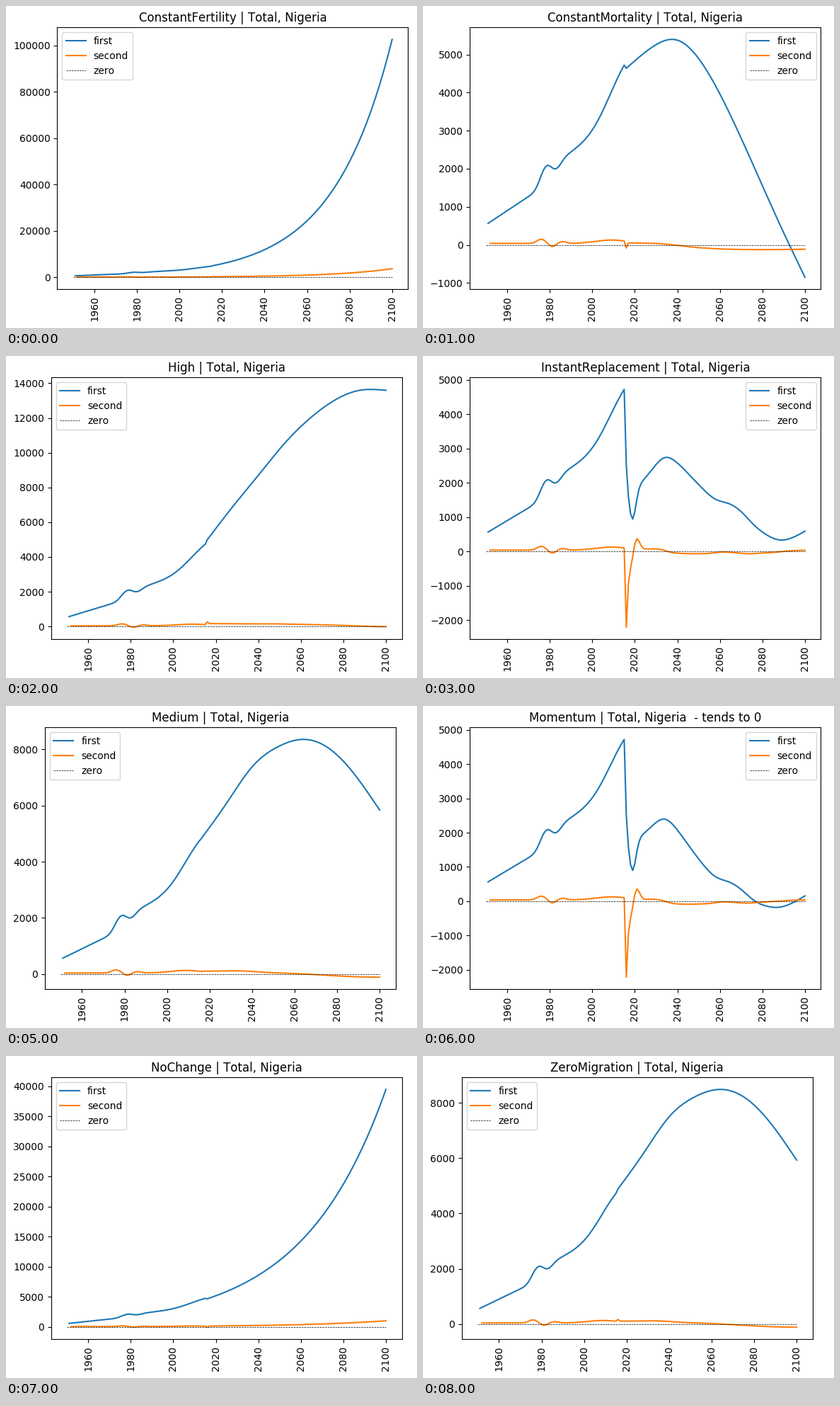
A matplotlib script for the animation above (9000 ms loop, 581 px wide and 455 px high).

```python
import numpy as np
import matplotlib.pyplot as plt
from matplotlib.animation import FuncAnimation

plt.rcParams["text.kerning_factor"] = 6

W, H, DPI = 581, 455, 100
AX_W, AX_H, AX_BOTTOM = 496, 369.6, 55

PAST = np.arange(1951, 2016)
FUTURE = np.arange(2016, 2101)
YEARS = np.concatenate([PAST, FUTURE])
T = FUTURE - 2016


def bump(x, center, height, width):
    return height * np.exp(-((x - center) / width) ** 2 / 2)


def smooth(*ys):
    """Natural cubic spline through evenly spaced values, 2016 to 2100."""
    ys, n = np.array(ys, float), len(ys)
    a = 4 * np.eye(n) + np.eye(n, k=1) + np.eye(n, k=-1)
    a[0], a[-1] = np.eye(n)[0], np.eye(n)[-1]
    m = np.linalg.solve(a, np.pad(np.diff(ys, 2), 1))
    x = T * (n - 1) / T[-1]
    i = np.minimum(x.astype(int), n - 2)
    v = x - i
    u = 1 - v
    return (u * ys[i] + v * ys[i + 1]
            + (u**3 - u) * m[i] + (v**3 - v) * m[i + 1])


# Past increments: steady rise, a wobble around 1980, faster rise after 2000
change = (37 + bump(PAST, 1976, 112, 2) - bump(PAST, 1981.2, 88, 1.6)
          + bump(PAST, 1986, 48, 1.8) + bump(PAST, 2009, 90, 7.5))
past = 565 + np.cumsum(change) - change[0]

fixed_fertility = 4990 * np.exp(0.036 * T)
no_change = 4650 * np.exp(0.02547 * T)
fixed_mortality = smooth(4640, 5190, 5380, 4740, 3520, 2060, 560, -850)
high = smooth(4990, 6900, 8700, 10490, 11950, 13030, 13600, 13590)
medium = smooth(4815, 6085, 7380, 8090, 8358, 8045, 7130, 5840)
low = smooth(4620, 5350, 5930, 5900, 5250, 4170, 2800, 1350)
no_migration = 1.015 * medium

# Sudden drop in births, then waves as smaller cohorts grow up
shock = 990 * np.exp(-1.2 * T) - bump(FUTURE, 2018.9, 900, 1.6)
replacement = shock + smooth(1700, 1960, 2380, 2735, 2580, 2210, 1825, 1520,
                             1400, 1160, 775, 485, 335, 400, 590)
momentum = replacement - smooth(10, 190, 500, 745, 830, 750, 510, 435)

# name, future values, left edge of the axes
SCENES = [
    ("ConstantFertility", fixed_fertility, 72.4),
    ("ConstantMortality", fixed_mortality, 66.45),
    ("High", high, 63.6),
    ("InstantReplacement", replacement, 66.45),
    ("Low", low, 54.8),
    ("Medium", medium, 54.8),
    ("Momentum", momentum, 66.45),
    ("NoChange", no_change, 63.6),
    ("ZeroMigration", no_migration, 54.8),
]

fig = plt.figure(figsize=(W / DPI, H / DPI), dpi=DPI)
ax = fig.add_axes([0.1, 0.1, 0.8, 0.8])


def draw(i):
    name, future, left = SCENES[i]
    first = np.concatenate([past, future])
    suffix = "  - tends to 0" if abs(first[-1]) < 300 else ""
    ax.clear()
    ax.set_position([left / W, AX_BOTTOM / H, AX_W / W, AX_H / H])
    ax.plot(YEARS, first, label="first")
    ax.plot(YEARS[1:], np.diff(first), label="second")
    ax.plot([1950, 2100], [0, 0], "k--", lw=0.5, label="zero")
    ax.tick_params(axis="x", rotation=90)
    ax.set_title(f"{name} | Total, Nigeria{suffix}")
    ax.legend(loc="best")
    return ax.get_children()


anim = FuncAnimation(fig, draw, frames=len(SCENES), interval=1000,
                     init_func=lambda: [], repeat=True)
plt.show()
```
